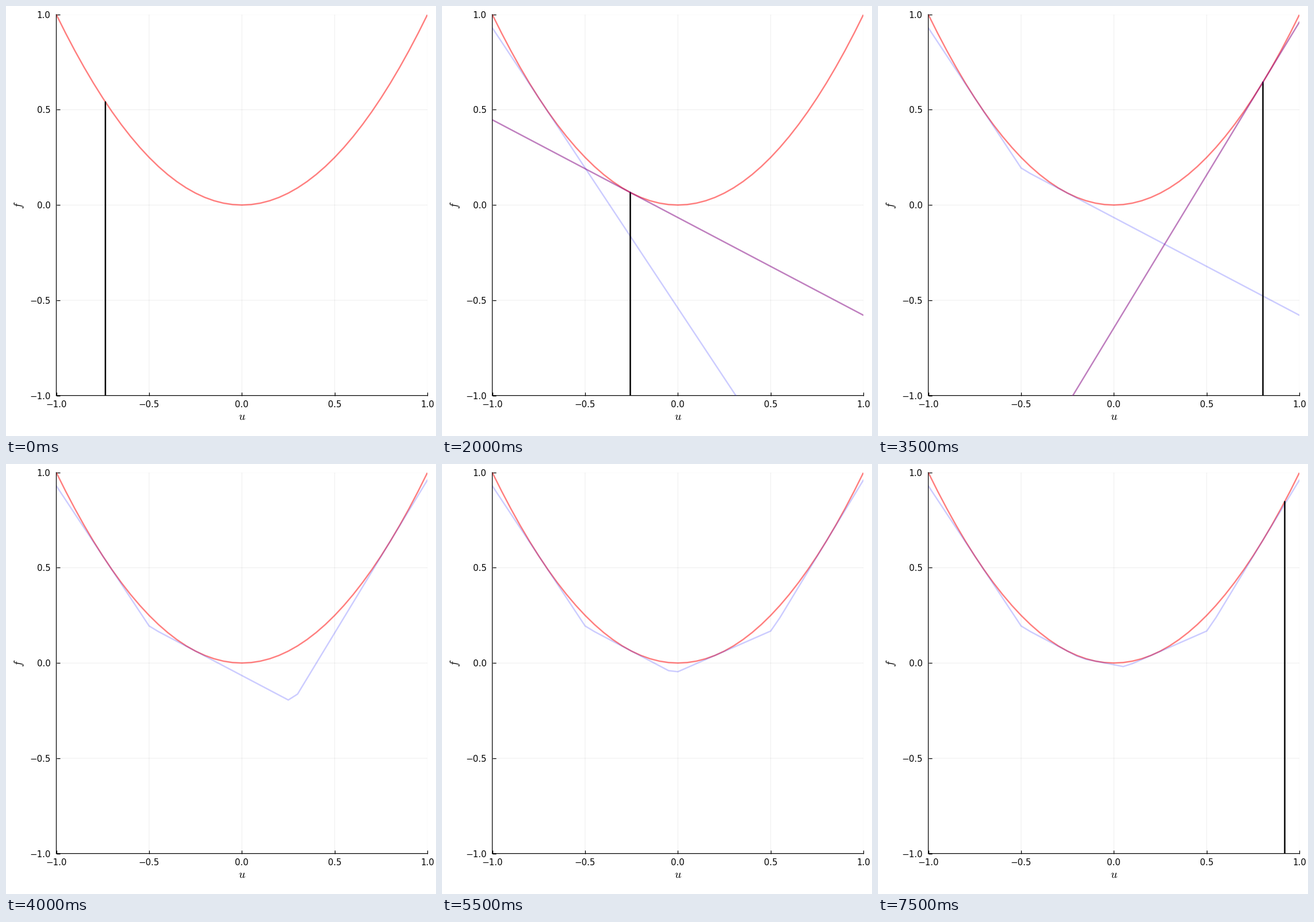
Animation, 748 px wide and 748 px high, one loop 8 s. Source, as a matplotlib script:

```python
import numpy as np
import matplotlib.pyplot as plt
from matplotlib.animation import FuncAnimation

SIZE = 748
LEFT, RIGHT, TOP, BOTTOM = 87.5, 733.2, 14.8, 677.6
PT = 0.72  # points per pixel at 100 dpi

plt.rcParams.update({
    "font.family": "DejaVu Sans",
    "mathtext.fontset": "cm",
    "path.snap": False,
    "lines.solid_capstyle": "round",
    "lines.solid_joinstyle": "round",
})

SAMPLES = np.array([-0.7355, -0.2565, 0.803, 0.2135, -0.0949, 0.9205])
STEPS = 16  # each sample takes three steps: probe, tangent, updated bound
U = np.linspace(-1, 1, 41)
TICKS = np.linspace(-1, 1, 5)


def f(u):
    return u ** 2


def tangent(s, u):
    return f(s) + 2 * s * (u - s)


fig = plt.figure(figsize=(SIZE / 100, SIZE / 100), dpi=100, facecolor="white")
ax = fig.add_axes([LEFT / SIZE, 1 - BOTTOM / SIZE,
                   (RIGHT - LEFT) / SIZE, (BOTTOM - TOP) / SIZE])
ax.set(xlim=(-1, 1), ylim=(-1, 1), xticks=TICKS, yticks=TICKS)
ax.set_axisbelow(True)
ax.grid(color="black", alpha=0.08, linewidth=0.9 * PT)
ax.tick_params(direction="in", length=6.4 * PT, width=1.25 * PT,
               labelbottom=False, labelleft=False)
for side in ("top", "right"):
    ax.spines[side].set_visible(False)
for side in ("left", "bottom"):
    ax.spines[side].set_linewidth(1.25 * PT)


def label(x, y, text, size, **kw):
    fig.text(x / SIZE, 1 - y / SIZE, text, fontsize=size * PT, **kw)


for t in TICKS:
    text = f"{t:.1f}".replace("-", "\u2212")
    px = LEFT + (t + 1) / 2 * (RIGHT - LEFT)
    py = BOTTOM - (t + 1) / 2 * (BOTTOM - TOP)
    label(px, 692, text, 15, ha="center", va="center_baseline")
    label(77.5, py, text, 15, ha="right", va="center_baseline")
label(410, 714, "$u$", 20, ha="center", va="center")
label(23.3, 346.2, "$f$", 20, ha="center", va="center", rotation=90)


def curve(color, alpha, order):
    return ax.plot([], [], color=color, alpha=alpha, linewidth=2.5 * PT,
                   zorder=order)[0]


parabola = curve("red", 0.5, 3)
parabola.set_data(U, f(U))
bound = curve("blue", 0.2, 4)
probe = curve("black", 1, 5)
cut = curve("purple", 0.5, 6)


def update(step):
    k, phase = divmod(step, 3)
    s = SAMPLES[k]
    known = SAMPLES[:k + (phase == 2)]
    if len(known):
        bound.set_data(U, np.max([tangent(v, U) for v in known], axis=0))
    else:
        bound.set_data([], [])
    probe.set_data([s, s], [-1, f(s)])
    probe.set_visible(phase < 2)
    cut.set_data(U, tangent(s, U))
    cut.set_visible(phase == 1)
    return bound, probe, cut


anim = FuncAnimation(fig, update, frames=STEPS, interval=500,
                     repeat=True, repeat_delay=0)
plt.show()
```
